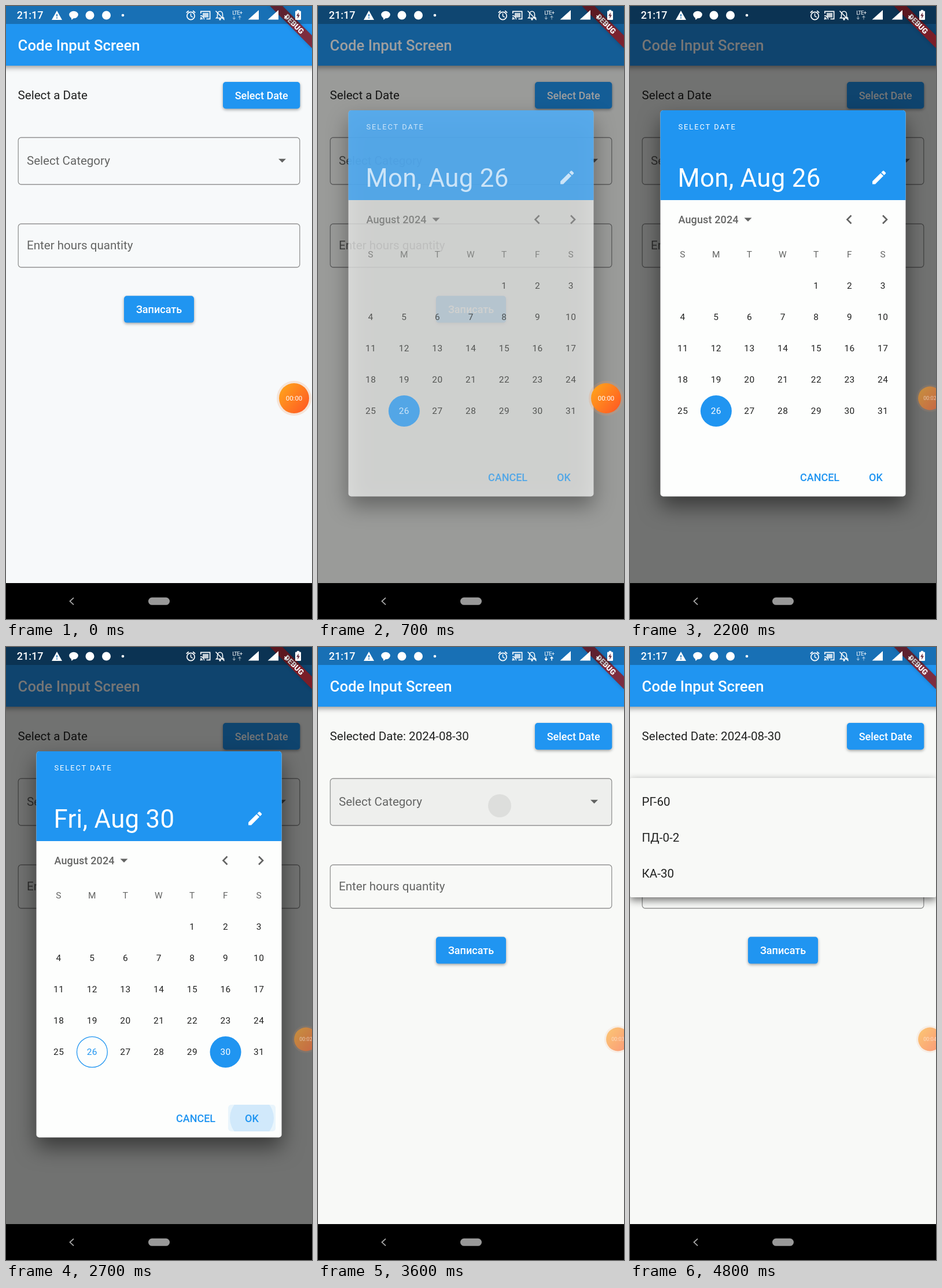
Animation of 529 by 1058 pixels, one loop 5.3 s. Source, as an HTML page with a canvas:

```html
<!DOCTYPE html>
<html lang="en">
<head>
<meta charset="utf-8">
<title>Code Input Screen</title>
<style>
html, body { margin: 0; width: 100%; height: 100%; overflow: hidden; background: #000; }
canvas { display: block; width: 100vw; height: 100vh; }
</style>
</head>
<body>
<canvas id="stage" width="529" height="1058"></canvas>
<script>
const ctx = document.getElementById('stage').getContext('2d');
const LOOP = 5300, STEP = 100;
const W = 529, BODY_H = 996;
const BLUE = '#2095f1', INK = '#202120', HINT = '#646564';

const clamp = v => Math.max(0, Math.min(1, v));
const progress = (t, from, to) => clamp((t - from) / (to - from));
const easeOut = p => 1 - (1 - p) ** 3;
const mix = (a, b, p) => a + (b - a) * p;

function group(fn, alpha = 1) {
  ctx.save();
  ctx.globalAlpha *= alpha;
  fn();
  ctx.restore();
}

function text(str, x, y, size, color, { weight = 400, align = 'left', spacing = 0 } = {}) {
  ctx.font = `${weight} ${size}px Roboto, sans-serif`;
  ctx.textAlign = align;
  ctx.letterSpacing = spacing + 'px';
  ctx.fillStyle = color;
  ctx.fillText(str, x, y);
}

function box(x, y, w, h, r, color) {
  ctx.beginPath();
  ctx.roundRect(x, y, w, h, r);
  ctx.fillStyle = color;
  ctx.fill();
}

function shadowBox(x, y, w, h, r, color, blur, dy, shade) {
  group(() => {
    ctx.shadowColor = `rgba(0,0,0,${shade})`;
    ctx.shadowBlur = blur;
    ctx.shadowOffsetY = dy;
    box(x, y, w, h, r, color);
  });
}

function disc(x, y, r, color) {
  ctx.beginPath();
  ctx.arc(x, y, r, 0, Math.PI * 2);
  ctx.fillStyle = color;
  ctx.fill();
}

function ring(x, y, r, color, width) {
  ctx.beginPath();
  ctx.arc(x, y, r, 0, Math.PI * 2);
  ctx.strokeStyle = color;
  ctx.lineWidth = width;
  ctx.stroke();
}

function trace(points) {
  ctx.beginPath();
  points.forEach(([x, y]) => ctx.lineTo(x, y));
}

function poly(color, ...points) {
  trace(points);
  ctx.fillStyle = color;
  ctx.fill();
}

function line(color, width, ...points) {
  trace(points);
  ctx.strokeStyle = color;
  ctx.lineWidth = width;
  ctx.stroke();
}

const dropArrow = (x, y) => poly('#626362', [x - 6.5, y - 3.2], [x + 6.5, y - 3.2], [x, y + 3.3]);

function button(label, x, y, w) {
  shadowBox(x, y, w, 46.3, 5, BLUE, 5, 2, .35);
  text(label, x + w / 2, y + 29.5, 18, '#fff', { weight: 500, align: 'center' });
}

function field(label, y, h, baseline) {
  ctx.beginPath();
  ctx.roundRect(21.2, y, 486.6, h, 5);
  ctx.strokeStyle = '#929392';
  ctx.lineWidth = 1.3;
  ctx.stroke();
  text(label, 36, baseline, 20.57, HINT);
}

function categoryTouch(t) {
  if (t < 3500) return;
  group(() => {
    ctx.beginPath();
    ctx.roundRect(21.2, 227, 486.6, 81, 5);
    ctx.clip();
    ctx.fillStyle = `rgba(0,0,0,${.038 * progress(t, 3400, 3600)})`;
    ctx.fillRect(20, 226, 490, 84);
    if (t > 3500) disc(314, 274, 20 + (t - 3600) * .22, 'rgba(0,0,0,.07)');
  });
}

function form(t) {
  const p = progress(t, 0, 300);
  ctx.fillStyle = `rgb(${mix(247, 248, p)},249,${mix(250, 247, p)})`;
  ctx.fillRect(0, 0, W, BODY_H);
  shadowBox(-10, -10, W + 20, 113, 0, BLUE, 9, 3, .4);
  text('Code Input Screen', 20.6, 76.8, 25.71, '#fff', { weight: 500 });
  text(t < 2800 ? 'Select a Date' : 'Selected Date: 2024-08-30', 20.6, 161, 20.57, INK);
  button('Select Date', 375, 131, 133.3);
  categoryTouch(t);
  field('Select Category', 227, 81, 274);
  dropArrow(477.5, 267);
  field('Enter hours quantity', 376, 75, 420);
  button('Записать', 204, 500.3, 121);
}

function menu(t) {
  const p = progress(t, 3700, 4000);
  if (!p) return;
  group(() => {
    const grow = progress(p, .25, .5);
    const top = mix(236, 226, grow), bottom = mix(298, 432, grow);
    shadowBox(0, top, W, bottom - top, 2.5, '#f8f9f7', 14, 5, .55);
    ['РГ-60', 'ПД-0-2', 'КА-30'].forEach((label, i) => {
      const start = .5 + (i + 1) / 9;
      group(() => text(label, 20.6, 274.3 + i * 61.7, 20.57, INK), progress(p, start, start + 1 / 6));
    });
  }, progress(p, 0, .25));
}

function pencil(x, y) {
  group(() => {
    ctx.translate(x, y);
    ctx.rotate(-Math.PI / 4);
    poly('#fff', [-15.5, 0], [-12, -3.4], [8, -3.4], [8, 3.4], [-12, 3.4]);
    box(9.6, -3.4, 5.2, 6.8, [0, 1.5, 1.5, 0], '#fff');
  });
}

function calendar(selected) {
  const colX = i => 91.2 + 57.67 * i;
  const opts = { align: 'center', spacing: .5 };
  [...'SMTWTFS'].forEach((d, i) => text(d, colX(i), 434.3, 15.43, HINT, opts));
  for (let day = 1; day <= 31; day++) {
    const cell = day + 3, x = colX(cell % 7), y = 483 + 54 * Math.floor(cell / 7);
    const picked = day === selected, today = day === 26;
    if (picked) disc(x, y, 27, BLUE);
    else if (today) ring(x, y, 26.4, BLUE, 1.3);
    text(day, x, y + 5.4, 15.43, picked ? '#fff' : today ? BLUE : INK, opts);
  }
}

function okTouch(t) {
  if (t < 2500) return;
  group(() => {
    ctx.beginPath();
    ctx.roundRect(384, 790, 82, 46, 5);
    ctx.clip();
    ctx.fillStyle = 'rgba(33,150,243,.09)';
    ctx.fill();
    disc(425, 813, 12 + (t - 2500) * .13, 'rgba(33,150,243,.12)');
  });
}

function dateDialog(t) {
  const alpha = t < 2800 ? easeOut(progress(t, 650, 800)) : 0;
  if (!alpha) return;
  const changed = t >= 2300;
  group(() => {
    ctx.fillStyle = 'rgba(0,0,0,.54)';
    ctx.fillRect(0, 0, W, BODY_H);
    shadowBox(52.5, 180, 424, 666.5, 5, '#fdfefd', 36, 17, .5);
    box(52.5, 180, 424, 155, [5, 5, 0, 0], BLUE);
    text('SELECT DATE', 83.5, 212.8, 12.86, '#fff', { spacing: 1.93 });
    text(changed ? 'Fri, Aug 30' : 'Mon, Aug 26', 82.5, 312.3, 43.71, '#fff', { spacing: .32 });
    pencil(430, 296.5);
    text('August 2024', 83.4, 375, 18, HINT, { weight: 500, spacing: .13 });
    dropArrow(204, 368.6);
    line('#626362', 2.6, [382.5, 361.5], [375.5, 368.5], [382.5, 375.5]);
    line('#626362', 2.6, [437, 361.5], [444, 368.5], [437, 375.5]);
    calendar(changed ? 30 : 26);
    okTouch(t);
    const action = { weight: 500, align: 'center' };
    text('CANCEL', 328, 819.5, 18, BLUE, action);
    text('OK', 425, 819.5, 18, BLUE, action);
  }, alpha);
}

function debugBanner() {
  group(() => {
    ctx.translate(W, 0);
    ctx.rotate(Math.PI / 4);
    group(() => {
      ctx.shadowColor = 'rgba(0,0,0,.4)';
      ctx.shadowBlur = 7;
      box(-51.4, 36, 102.8, 15.4, 0, 'rgba(30,10,30,.45)');
    });
    box(-51.4, 36, 102.8, 15.4, 0, 'rgba(183,28,28,.627)');
    text('DEBUG', 0, 48.4, 13.1, '#fff', { weight: 900, align: 'center' });
  });
}

function warningIcon() {
  poly('#fff', [79, 24], [97, 24], [88, 8]);
  box(87.2, 14, 1.7, 4, 0, '#1a70b5');
  box(87.2, 19.6, 1.7, 1.8, 0, '#1a70b5');
}

function alarmIcon() {
  ring(319.5, 17, 6.6, '#fff', 1.7);
  line('#fff', 1.4, [319.5, 12.8], [319.5, 17.3], [322.8, 19.3]);
  line('#fff', 1.8, [311.8, 11.6], [315.8, 8.2]);
  line('#fff', 1.8, [327.2, 11.6], [323.2, 8.2]);
}

function castIcon() {
  line('#fff', 1.7, [336.8, 13], [336.8, 9.3], [352.6, 9.3], [352.6, 22.4], [346.5, 22.4]);
  box(340, 12, 10, 7.8, 0, 'rgba(255,255,255,.75)');
  ctx.strokeStyle = '#fff';
  ctx.lineWidth = 1.5;
  for (const r of [3.4, 6.6]) {
    ctx.beginPath();
    ctx.arc(336, 23.2, r, -Math.PI / 2, 0);
    ctx.stroke();
  }
  disc(336.8, 22.3, 1.2, '#fff');
}

function mutedBellIcon() {
  ctx.beginPath();
  ctx.moveTo(363.5, 20.8);
  ctx.lineTo(365.5, 18.8);
  ctx.lineTo(365.5, 14.5);
  ctx.bezierCurveTo(365.5, 7.5, 374.5, 7.5, 374.5, 14.5);
  ctx.lineTo(374.5, 18.8);
  ctx.lineTo(376.5, 20.8);
  ctx.closePath();
  ctx.strokeStyle = '#fff';
  ctx.lineWidth = 1.5;
  ctx.stroke();
  disc(370, 23, 1.7, '#fff');
  line('#fff', 1.6, [362.5, 8.5], [377.5, 24]);
}

function networkIcon(t) {
  const active = (t >= 1000 && t < 1700) || (t >= 3200 && t < 4800);
  text('LTE+', 399.8, 14.8, 9.5, '#fff', { align: 'center', spacing: -.8 });
  const color = `rgba(255,255,255,${active ? 1 : .38})`;
  for (const [x, dir] of [[394.3, 1], [404, -1]]) {
    line(color, 1.5, [x, 20 - 3.5 * dir], [x, 20 + 2.5 * dir]);
    poly(color, [x - 3.3, 20 + .3 * dir], [x + 3.3, 20 + .3 * dir], [x, 20 + 4 * dir]);
  }
}

function statusBar(t) {
  ctx.fillStyle = 'rgba(0,0,0,.25)';
  ctx.fillRect(0, 0, W, 31);
  text('21:17', 18.8, 22.4, 18, '#fff', { weight: 500 });
  warningIcon();
  ctx.beginPath();
  ctx.ellipse(117, 15, 7.8, 6.3, 0, 0, Math.PI * 2);
  ctx.fillStyle = '#fff';
  ctx.fill();
  poly('#fff', [112, 18], [118, 20], [113.5, 24]);
  disc(145, 16, 7.5, '#fff');
  disc(173.5, 16, 7.5, '#fff');
  disc(202, 16, 2.3, '#fff');
  alarmIcon();
  castIcon();
  mutedBellIcon();
  networkIcon(t);
  for (const x of [437, 471]) poly('#fff', [x, 7], [x, 23.5], [x - 18.5, 23.5]);
  line('#fff', 1.4, [481.5, 16.5], [486.5, 21.5]);
  line('#fff', 1.4, [486.5, 16.5], [481.5, 21.5]);
  box(500, 8.5, 10, 15.5, 1.2, '#fff');
  box(503, 6.8, 4, 2.5, 0, '#fff');
  poly('#6a3040', [506, 11], [502, 17], [504.5, 17], [504, 22], [508, 15.5], [505.5, 15.5]);
}

function navBar() {
  ctx.fillStyle = '#000';
  ctx.fillRect(0, BODY_H, W, 62);
  line('#a8a8a8', 1.8, [117, 1021.3], [110.5, 1027.3], [117, 1033.3]);
  box(246, 1020.8, 37, 13, 6.5, '#999');
}

function recorder(t) {
  const slide = easeOut(progress(t, 1500, 1900));
  const x = mix(498, 518.5, slide), y = 677, scale = mix(1, .785, slide);
  const seconds = [1100, 2100, 3200, 4200].filter(at => t >= at).length;
  group(() => {
    ctx.translate(x, y);
    ctx.scale(scale, scale);
    disc(0, 0, 30, 'rgba(236,150,95,.22)');
    const fill = ctx.createLinearGradient(-20, -16, 20, 16);
    fill.addColorStop(0, '#ff9d1c');
    fill.addColorStop(1, '#ff6023');
    disc(0, 0, 26, fill);
    text(`00:0${seconds}`, 0, 4.2, 11.5, '#fff', { align: 'center' });
  }, mix(1, .56, progress(t, 1800, 2100)));
}

function draw(now) {
  const t = Math.floor((now % LOOP) / STEP) * STEP;
  form(t);
  menu(t);
  dateDialog(t);
  debugBanner();
  statusBar(t);
  navBar();
  recorder(t);
  requestAnimationFrame(draw);
}
requestAnimationFrame(draw);
</script>
</body>
</html>
```
